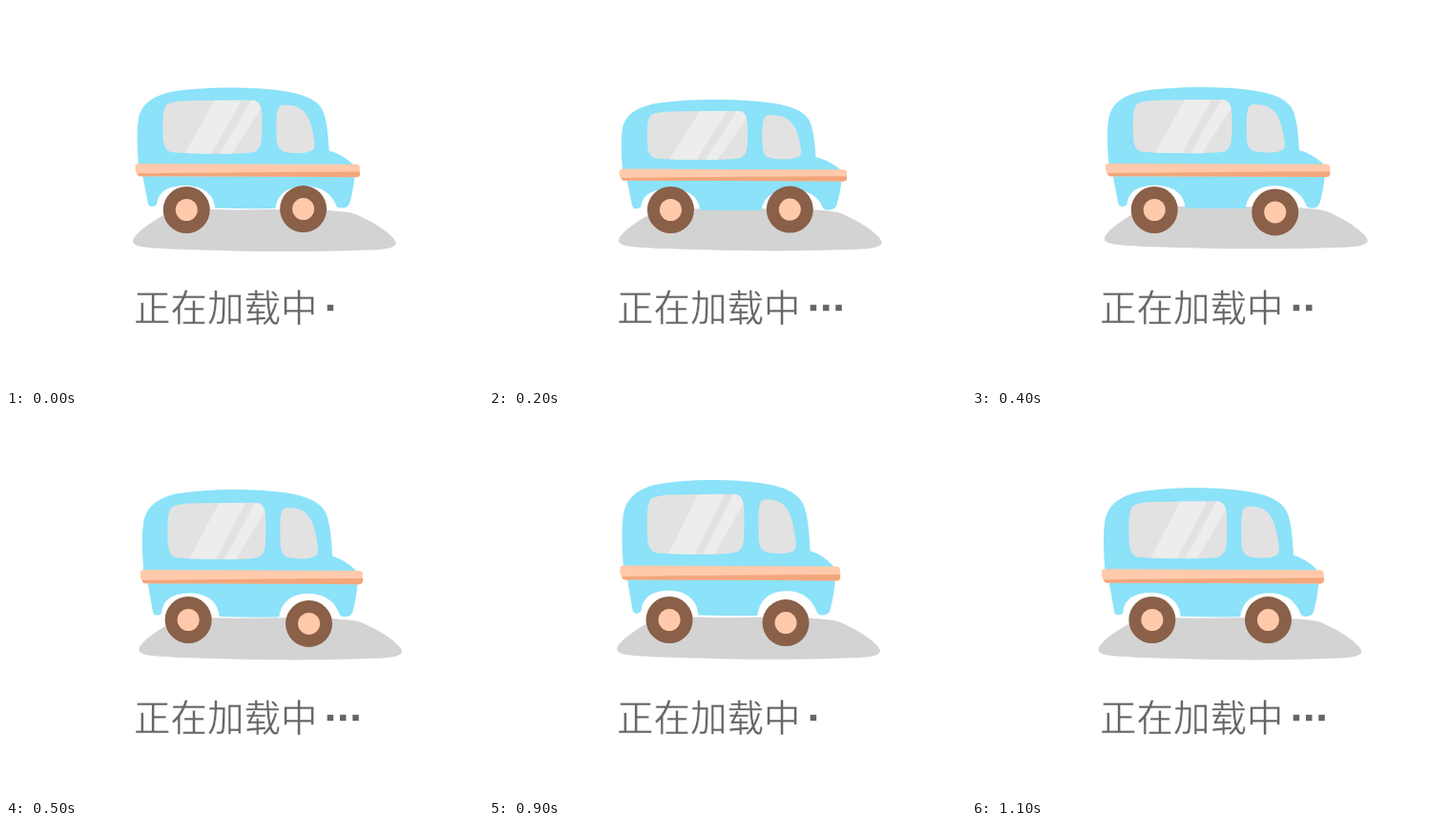
An HTML page for the animation above (1200 ms loop, 500 by 400 pixels).

```html
<!DOCTYPE html>
<html lang="zh">
<head>
<meta charset="utf-8">
<style>
  html, body { margin: 0; width: 100%; height: 100%; overflow: hidden; background: #fff; }
  svg { display: block; width: 500px; height: 400px; }
  text { font: 300 38.5px "Noto Sans CJK SC", "Noto Sans CJK", sans-serif; stroke: #fff; stroke-width: .5px; }
</style>
</head>
<body>
<svg viewBox="0 0 500 400">
  <defs>
    <clipPath id="pane">
      <path d="M168 102Q172 97 200 97L257 96.500C267 97 268 106 268 120C268 139 268 147 261 151C255 155 185 153.500 174 152C165 150 164.500 140 164.500 125Q164 108 168 102Z"/>
    </clipPath>
    <g id="tire">
      <circle r="24.500" fill="#8a6049"/>
      <circle r="11.500" fill="#ffcaab"/>
    </g>
  </defs>

  <path id="shadow" fill="#d3d3d3" d="M133 247C133 240 150 228 168 218C188 211 215 214 240 214L320 213C340 215 355 215 365 218C385 226 408 241 409 249C408 254 395 256 380 256C330 258 280 258 240 257C200 256 160 255 145 253C137 252 133 250 133 247Z"/>

  <path id="chassis" fill="#8be2f9" d="M143 172L149 206Q150 210 153 210Q158 210 158.500 206C160 193 171 186.500 188 186.500C206 186.500 218 196 219 211.500Q250 212.500 282 212C284 195 296 187 313 187C331 187 341 197 345 208Q346 211.500 350 211.500Q357 212 359 207Q363 194 365 172Z"/>

  <g id="cabin">
    <path fill="#8be2f9" d="M139.500 168C138 150 137 132 139 118C141 103 151 93 172 88C203 82 255 82 284 86C309 89 325 95 331 107C336 118 337 135 338 150.500C346 152 358 159 366 168Z"/>
    <g clip-path="url(#pane)">
      <path fill="#e2e2e2" d="M160 90H272V158H160Z"/>
      <path fill="#ededed" d="M187 154L219 96H247L215 154ZM224 154L257 96H273L236 154Z"/>
    </g>
    <path fill="#e2e2e2" d="M284 108C285 101 290 101 297 102C312 103 318 115 321 131C323 143 325 149 318 151C312 154 296 153 290 151C283 148 283 140 283 128Q282.500 115 284 108Z"/>
  </g>

  <g id="stripe">
    <path fill="#ffcaab" d="M139 164Q250 164.500 366 165Q370 165 370 169V176Q370 180 366 180Q250 179 141 179Q138 179 137 175Q135 171 136 167Q136 164 139 164Z"/>
    <path fill="#f3a67c" d="M138 175.500Q260 174 370 173.500V176Q370 180 366 180Q250 179 141 179Q138.500 179 138 175.500Z"/>
  </g>

  <use id="rear" href="#tire"/>
  <use id="front" href="#tire"/>

  <g id="label" fill="#666">
    <text x="134" y="330">正在加载中</text>
  </g>
</svg>
<script>
const STEP = 100, STEPS = 12;

const byId = id => document.getElementById(id);
const move = (id, x, y) => byId(id).setAttribute("transform", `translate(${x} ${y})`);

const dots = Array.from({ length: 3 }, (_, i) => {
  const dot = document.createElementNS("http://www.w3.org/2000/svg", "rect");
  Object.entries({ x: 336.7 + 13.3 * i, y: 312.8, width: 6.5, height: 6.4 })
    .forEach(([name, value]) => dot.setAttribute(name, value));
  return byId("label").appendChild(dot);
});

// Cosine over the loop that is highest at the step `peak`.
const wave = (step, peak, cycles = 1) =>
  Math.cos(2 * Math.PI * cycles * (step - peak) / STEPS);

function render(time) {
  const step = Math.floor(time / STEP) % STEPS;
  const squash = 15 * wave(step, 2.1) + 3.6 * wave(step, 1.7, 2);
  const sway = 2.7 * wave(step, 4.3);

  const scaleX = (233.8 + 0.25 * squash) / 234;
  const roof = 79.3 + squash;
  const stripe = 162.2 + 0.45 * squash;
  const floor = 211 + 0.16 * squash;

  // Stretches a part so that its line `from` lands on `to`.
  const fit = (id, scaleY, from, to) => byId(id).setAttribute("transform",
    `translate(${255 + sway} ${to}) scale(${scaleX} ${scaleY}) translate(-253 ${-from})`);

  fit("cabin", (stripe - roof) / 81, 83, roof);
  fit("stripe", 0.93 - 0.006 * squash, 164, stripe);
  fit("chassis", 0.97 - 0.005 * squash, 212, floor);
  move("rear", 190 + 0.45 * sway, 213.5);
  move("front", 314 + 1.4 * sway, 215.5 + 3.1 * wave(step, 6.7));
  move("shadow", 2.9 + 3.4 * wave(step, 5), 1.7 * wave(step, 0.8, 2) - 1.7);
  dots.forEach((dot, i) => dot.setAttribute("visibility", i <= step % 3 ? "visible" : "hidden"));
}

function tick() {
  render(performance.now());
  requestAnimationFrame(tick);
}
tick();
</script>
</body>
</html>
```
